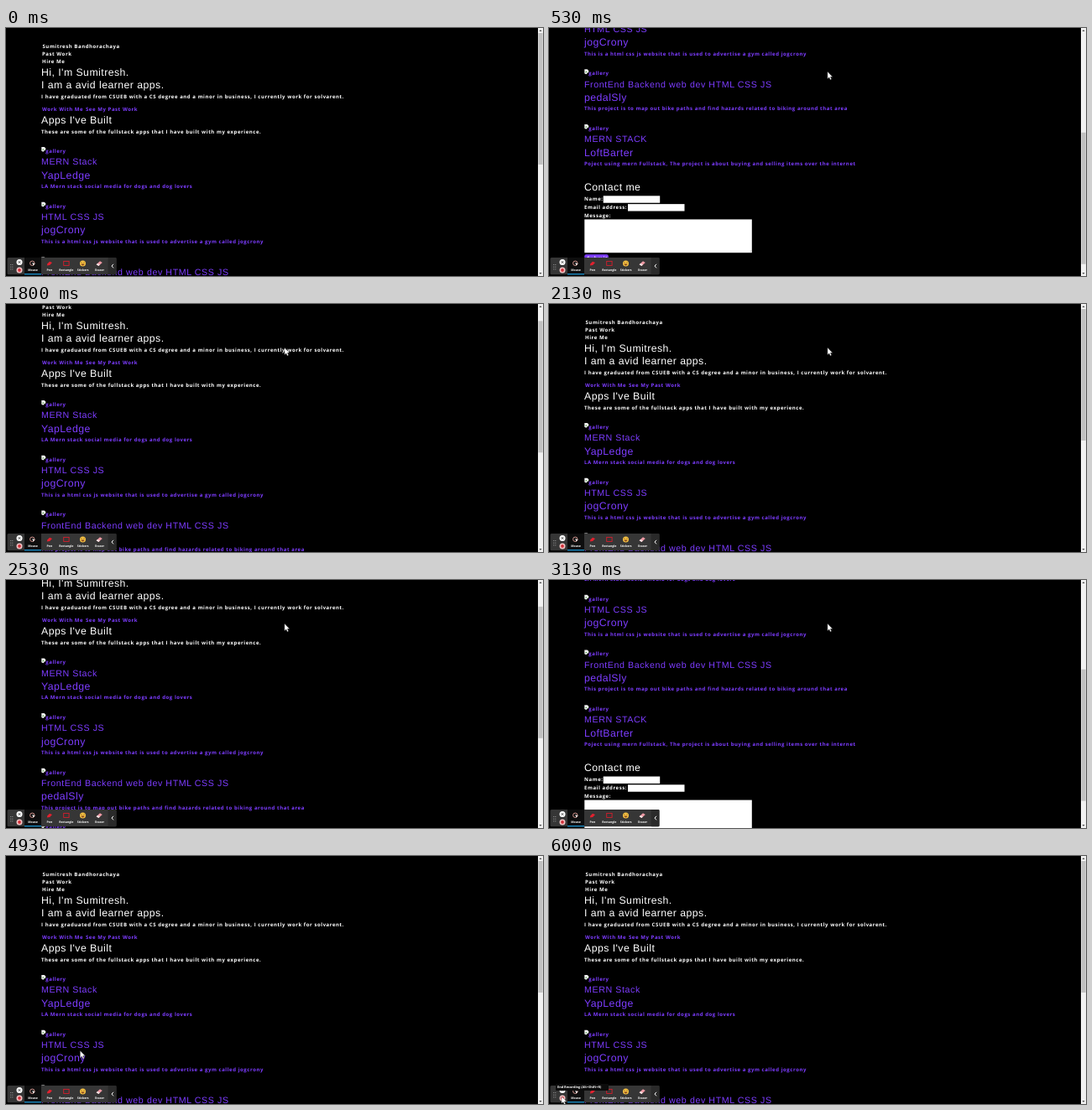
An HTML page that plays this animation: 640x296 px, repeating every 6060 ms.

```html
<!DOCTYPE html>
<html lang="en">
<head>
<meta charset="utf-8">
<title>Portfolio scroll</title>
<style>
  html, body { margin: 0; width: 100%; height: 100%; overflow: hidden; background: #000; }
  svg { display: block; width: 100vw; height: 100vh; }
  text { text-rendering: geometricPrecision; white-space: pre; }
  .head { font: 12.3px "Liberation Sans", Arial, sans-serif; letter-spacing: .45px; }
  .sub { font-size: 10.67px; letter-spacing: .58px; }
  .body { font: bold 6.05px "Open Sans", sans-serif; letter-spacing: .54px; }
  .tool { font: bold 3.5px "Open Sans", sans-serif; fill: #fff; text-anchor: middle; }
  .tip { font: bold 3.85px "Open Sans", sans-serif; fill: #fff; }
</style>
</head>
<body>
<svg viewBox="0 0 640 296" preserveAspectRatio="none">
  <rect width="640" height="296"/>
  <g id="page"></g>
  <g id="bar">
    <rect x="634" width="6" height="296" fill="#f1f1f1"/>
    <path d="M635.4 4L637 2L638.6 4ZM635.4 292L637 294L638.6 292Z" fill="#505050"/>
    <rect id="thumb" x="634.4" y="6" width="5.2" height="157" fill="#c1c1c1"/>
  </g>
  <g id="tools"></g>
  <g id="tip">
    <rect x="8" y="272" width="63" height="8" rx="1" fill="#0c0c0c"/>
    <text class="tip" x="10" y="277.4">End Recording (Alt+Shift+R)</text>
  </g>
  <path id="cursor" d="M0 0V8.2L1.9 6.5L3.2 9.4L4.6 8.8L3.3 6H5.8Z"
        fill="#fff" stroke="#555" stroke-width=".35"/>
</svg>
<script>
const LOOP = 6060, FRAME = 1000 / 15;
const WHITE = '#fff', PURPLE = '#7d3cff';
const $ = id => document.getElementById(id);

const text = (cls, x, y, str, fill) =>
  `<text class="${cls}" x="${x}" y="${y}" fill="${fill}">${str}</text>`;
const rect = (x, y, w, h, fill, rx = 0) =>
  `<rect x="${x}" y="${y}" width="${w}" height="${h}" rx="${rx}" fill="${fill}"/>`;

const brokenImage = (x, y) =>
  `<path d="M${x} ${y}h3.4l1.6 1.6v1.6l-2 1.6l-1 1l-2 -1z" fill="#f2f2f2"/>` +
  `<path d="M${x + .7} ${y + 3.8}l1.3 -1.6l1.4 1.3z" fill="#4a9a3c"/>`;

const apps = [
  ['MERN Stack', 'YapLedge', 'LA Mern stack social media for dogs and dog lovers'],
  ['HTML CSS JS', 'jogCrony', 'This is a html css js website that is used to advertise a gym called jogcrony'],
  ['FrontEnd Backend web dev HTML CSS JS', 'pedalSly', 'This project is to map out bike paths and find hazards related to biking around that area'],
  ['MERN STACK', 'LoftBarter', 'Poject using mern Fullstack, The project is about buying and selling items over the internet']
];

function appCard([stack, name, about], i) {
  const y = 142 + i * 65.7;
  return brokenImage(42.3, y) +
    text('body', 47.3, y + 7, 'gallery', PURPLE) +
    text('head sub', 42, y + 21.3, stack, PURPLE) +
    text('head', 42, y + 37.6, name, PURPLE) +
    text('body', 42, y + 49, about, PURPLE);
}

$('page').innerHTML =
  text('body', 43.5, 23.8, 'Sumitresh Bandhorachaya', WHITE) +
  text('body', 43, 32.8, 'Past Work', WHITE) +
  text('body', 43, 41.8, 'Hire Me', WHITE) +
  text('head', 42, 57, "Hi, I'm Sumitresh.", WHITE) +
  text('head', 42, 72, 'I am a avid learner apps.', WHITE) +
  text('body', 42, 83.8, 'I have graduated from CSUEB with a CS degree and a minor in business, I currently work for solvarent.', WHITE) +
  text('body', 43, 98.8, 'Work With Me', PURPLE) +
  text('body', 95, 98.8, 'See My Past Work', PURPLE) +
  text('head', 42, 114, "Apps I've Built", WHITE) +
  text('body', 42, 125.8, 'These are some of the fullstack apps that I have built with my experience.', WHITE) +
  apps.map(appCard).join('') +
  text('head', 42, 418.3, 'Contact me', WHITE) +
  text('body', 42, 430.4, 'Name:', WHITE) + rect(64.7, 424.4, 67.5, 8.4, WHITE) +
  text('body', 42, 440.3, 'Email address:', WHITE) + rect(94, 434.2, 67.5, 8.4, WHITE) +
  text('body', 42, 450.2, 'Message:', WHITE) + rect(42.3, 452.5, 199.5, 39.8, WHITE) +
  '<path d="M239 491.4l2 -2M240.2 491.4l.8 -.8" stroke="#888" stroke-width=".4"/>' +
  rect(42.3, 494.2, 28.5, 9.5, PURPLE, 2) +
  text('body', 45.3, 501.2, 'Submit', WHITE);

const toolNames = ['Mouse', 'Pen', 'Rectangle', 'Stickers', 'Eraser'];
const dots = [282, 284.7, 287.4].map(y =>
  rect(5.2, y, 1, 1, '#999') + rect(7.3, y, 1, 1, '#999')).join('');

$('tools').innerHTML =
  rect(1.5, 274, 130, 20.3, '#363636', 1.5) +
  rect(22, 274, 20, 20.3, '#0e0e0e') +
  rect(22, 293.2, 20, 1.2, '#1a9fe0') +
  rect(121.5, 274, 10, 20.3, '#2a2a2a', 1) + dots +
  '<circle cx="16" cy="279.5" r="3.5" fill="#fff"/>' +
  '<path d="M14.7 278.2l2.6 2.6m0 -2.6l-2.6 2.6" stroke="#222" stroke-width=".8"/>' +
  '<circle cx="16" cy="289" r="3.5" fill="#f0c4c4"/>' +
  '<circle cx="16" cy="289" r="1.9" fill="#d3303a"/>' +
  '<circle cx="31.3" cy="280.8" r="2.7" fill="none" stroke="#e6a39c" stroke-width=".9"/>' +
  '<path d="M31.2 280l3.6 1.6l-1.5 .5l-.6 1.6z" fill="#fff"/>' +
  '<path d="M48.8 283.6l.7 -2.3l2.5 -2.6l3 1.3l-2.8 3z" fill="#e3212f"/>' +
  '<rect x="68.7" y="278.4" width="6.4" height="5" fill="none" stroke="#d81e2c" stroke-width=".9"/>' +
  '<circle cx="91.5" cy="281" r="3.5" fill="#f6c343"/>' +
  '<path d="M89.5 281.6a2 2 0 0 0 4 0z" fill="#8a4b20"/>' +
  '<path d="M89.4 279.9h1.2m1.8 0h1.2" stroke="#5a3515" stroke-width=".7"/>' +
  '<path d="M107.6 282.3l4.4 -4l2.8 1.6l-4.4 4z" fill="#ef9aa5"/>' +
  '<path d="M107.6 282.3l1.5 -1.4l2.8 1.6l-1.5 1.4z" fill="#f5e8e8"/>' +
  toolNames.map((n, i) => `<text class="tool" x="${32 + i * 19.9}" y="289.8">${n}</text>`).join('') +
  '<path d="M128 281.8l-2 2.3l2 2.3" fill="none" stroke="#fff" stroke-width="1"/>';

// [time, scroll offset]
const scrollKeys = [
  [0, 0], [133, 0], [533, 224], [600, 239], [867, 239], [1333, 113], [1800, 27],
  [2067, 0], [2267, 0], [2533, 48.5], [2933, 190], [3133, 190], [3733, 0], [LOOP, 0]
];

function sample(keys, t) {
  const i = Math.max(1, keys.findIndex(k => k[0] >= t));
  const [t0, a] = keys[i - 1], [t1, b] = keys[i];
  return a + (b - a) * (t - t0) / (t1 - t0);
}

function ease(t, from, to) {
  const p = Math.min(1, Math.max(0, (t - from) / (to - from)));
  return p * p * (3 - 2 * p);
}

function draw(ms) {
  const t = Math.floor((ms % LOOP + 6.7) / FRAME) * FRAME;
  const scroll = sample(scrollKeys, Math.min(t, LOOP));
  $('page').setAttribute('transform', `translate(0 ${-scroll})`);
  $('thumb').setAttribute('y', 6 + scroll * .53);

  const p = ease(t, 4060, 5330);
  const x = 332 - 317 * p, y = 52.3 + 234.7 * p;
  $('cursor').setAttribute('transform', `translate(${x} ${y})`);
  $('cursor').style.display = t < 60 ? 'none' : '';
  $('tip').style.display = t < 5500 ? 'none' : '';
}

const start = performance.now();
function tick() {
  draw(performance.now() - start);
  requestAnimationFrame(tick);
}
draw(0);
requestAnimationFrame(tick);
</script>
</body>
</html>
```
